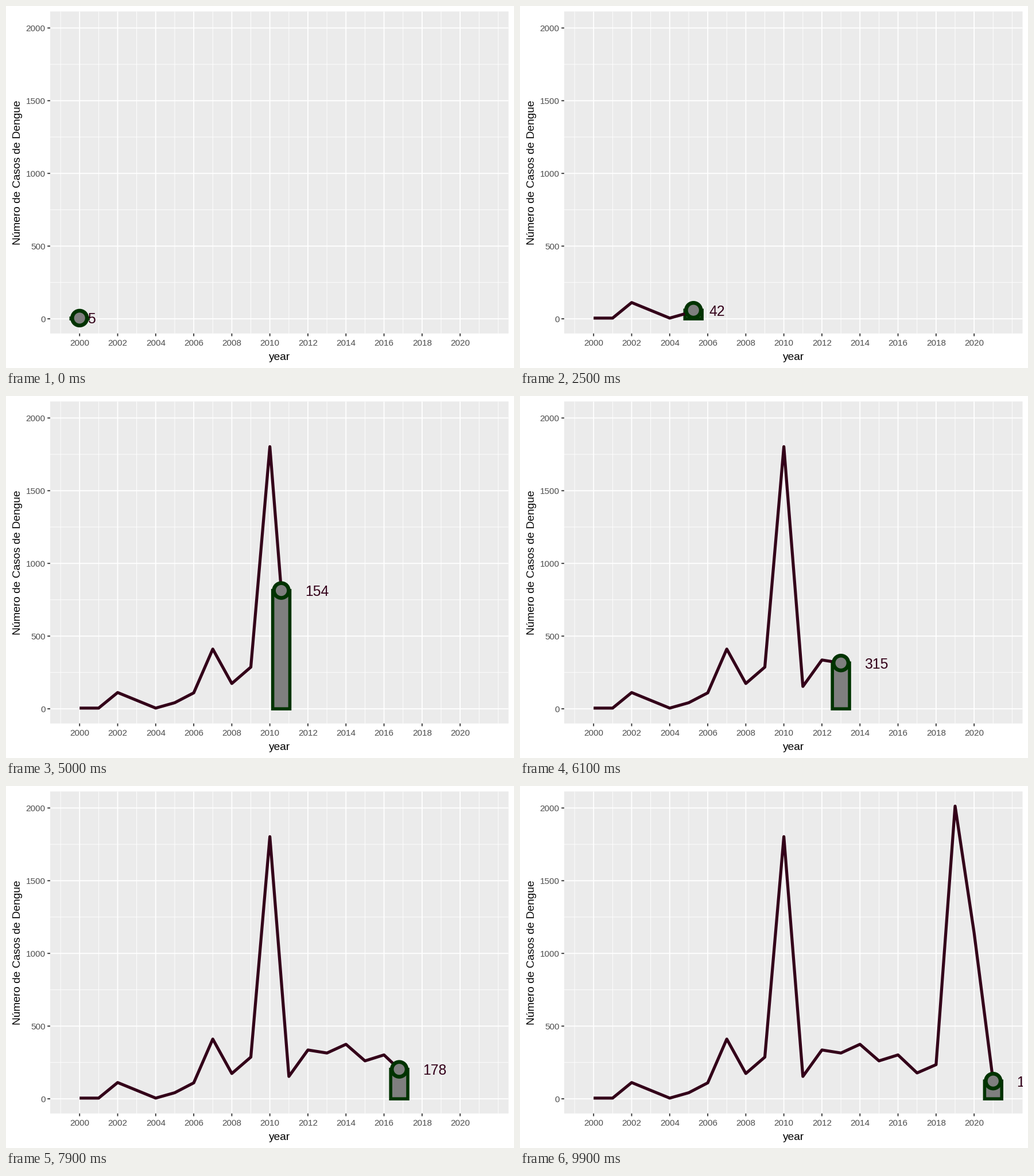
A matplotlib script for the animation above (10000 ms loop, 885 by 632 pixels).

```python
import numpy as np
import matplotlib.pyplot as plt
from matplotlib.animation import FuncAnimation
from matplotlib.patches import Circle, Rectangle

W, H, DPI = 885, 632, 100
FRAMES, INTERVAL = 100, 100
PX = 72 / DPI  # points per pixel

LEFT, RIGHT, TOP, BOTTOM = 77, 875.5, 9.55, 571.7
YEAR_LO, YEAR_HI = 1998.455, 2022.545
CASE_LO, CASE_HI = -100.65, 2113.65
BAR_W = 0.9 * (RIGHT - LEFT) / (YEAR_HI - YEAR_LO)
MAJOR, MINOR = 1.85, 0.93
TICK = 4.8
TICK_SIZE, TITLE_SIZE, LABEL_SIZE = 15.3, 19.1, 24.7

PURPLE, GREEN, GRAY = "#330019", "#003300", "#7f7f7f"

# No record for 2003
years = np.array([2000, 2001, 2002] + list(range(2004, 2022)))
cases = np.array([5, 5, 112, 5, 42, 110, 411, 174, 287, 1803, 154, 336,
                  315, 375, 261, 302, 178, 235, 2013, 1141, 122])
keys = np.round((years - 2000) * (FRAMES - 1) / 21).astype(int)


def sx(year):
    return LEFT + (year - YEAR_LO) / (YEAR_HI - YEAR_LO) * (RIGHT - LEFT)


def sy(value):
    return BOTTOM - (value - CASE_LO) / (CASE_HI - CASE_LO) * (BOTTOM - TOP)


plt.rcParams["font.family"] = "Liberation Sans"
fig = plt.figure(figsize=(W / DPI, H / DPI), dpi=DPI, facecolor="white")
ax = fig.add_axes([0, 0, 1, 1])
ax.set_xlim(0, W)
ax.set_ylim(H, 0)
ax.axis("off")


def stroke(x, y, color, width):
    ax.plot(x, y, color=color, lw=width * PX, solid_capstyle="butt",
            snap=False, zorder=2)


def write(x, y, text, size, color, **kw):
    return ax.text(x, y, text, fontsize=size * PX, color=color,
                   va="baseline", **kw)


def vline(year, width):
    x = sx(year)
    stroke([x, x], [TOP, BOTTOM], "white", width)
    return x


def hline(value, width):
    y = sy(value)
    stroke([LEFT, RIGHT], [y, y], "white", width)
    return y


panel = Rectangle((LEFT, TOP), RIGHT - LEFT, BOTTOM - TOP, fc="#ebebeb",
                  lw=0, snap=False, zorder=1)
ax.add_patch(panel)

for year in [*range(1999, 2022, 2), 2022]:
    vline(year, MINOR)
for value in range(250, 2000, 500):
    hline(value, MINOR)
for year in range(2000, 2021, 2):
    x = vline(year, MAJOR)
    stroke([x, x], [BOTTOM, BOTTOM + TICK], "#333333", MAJOR)
    write(x, 592.7, str(year), TICK_SIZE, "#4d4d4d", ha="center")
for value in range(0, 2001, 500):
    y = hline(value, MAJOR)
    stroke([LEFT - TICK, LEFT], [y, y], "#333333", MAJOR)
    write(68.5, y + 5.9, str(value), TICK_SIZE, "#4d4d4d", ha="right")

write((LEFT + RIGHT) / 2, 618.5, "year", TITLE_SIZE, "black", ha="center")
write(25, (TOP + BOTTOM) / 2, "Número de Casos de Dengue", TITLE_SIZE, "black",
      ha="center", rotation=90, rotation_mode="anchor")

bar = Rectangle((0, 0), BAR_W, 0, fc=GRAY, ec=GREEN, lw=5.55 * PX,
                joinstyle="miter", snap=False, zorder=3)
ax.add_patch(bar)
line, = ax.plot([], [], color=PURPLE, lw=5.2 * PX, solid_capstyle="butt",
                solid_joinstyle="round", snap=False, zorder=4)
dot = Circle((0, 0), 12.9, fc=GRAY, ec=GREEN, lw=6.6 * PX, zorder=5)
ax.add_patch(dot)
label = write(0, 0, "", LABEL_SIZE, PURPLE, ha="left", clip_on=True, zorder=6)
label.set_clip_path(panel)


def update(frame):
    x = sx(np.interp(frame, keys, years))
    y = sy(np.interp(frame, keys, cases))

    seen = keys <= frame
    line.set_data(np.append(sx(years[seen]), x), np.append(sy(cases[seen]), y))

    bar.set_xy((x - BAR_W / 2, y))
    bar.set_height(sy(0) - y)
    dot.center = (x, y)

    # The label jumps to the next count halfway between records
    nearest = int(np.interp(frame, keys, np.arange(len(keys))) + 0.5)
    text = str(cases[nearest])
    label.set_text(text)
    label.set_position((x + 0.556 * LABEL_SIZE * len(text), y + 9.6))
    return bar, line, dot, label


anim = FuncAnimation(fig, update, frames=FRAMES, interval=INTERVAL,
                     repeat=True, repeat_delay=0, blit=False)
plt.show()
```
